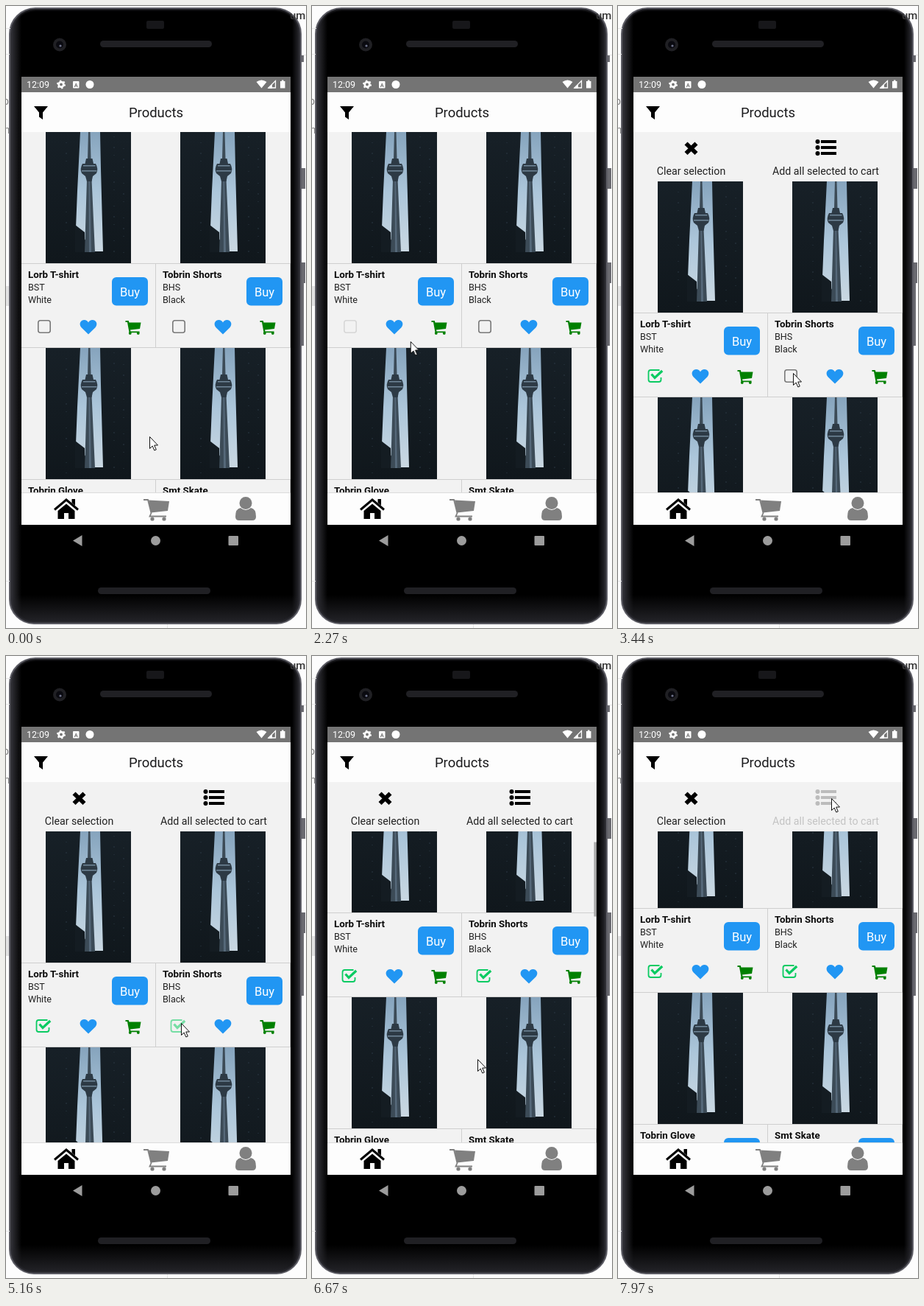
An HTML page for the animation above (8000 ms loop, 408 by 844 pixels).

```html
<!DOCTYPE html>
<html lang="en">
<head>
<meta charset="utf-8">
<title>Shop demo</title>
<style>
html, body { margin: 0; width: 100%; height: 100%; overflow: hidden; background: #fdfdfd; }
svg { display: block; font-family: Roboto, sans-serif; }
#stage { position: absolute; left: 0; top: 0; }
#phone {
  position: absolute; left: 4px; top: 2px; width: 398px; height: 837px; box-sizing: border-box;
  border: 2px solid #5c5c64; border-radius: 36px 36px 34px 34px;
  background:
    linear-gradient(transparent 795px, #26262b 835px),
    linear-gradient(90deg, #34343a, #000 15px, #000 383px, #2c2c32);
  box-shadow: inset 0 0 3px 1px #33333a;
}
.bold { font-weight: 700; font-size: 13.3px; }
.small { font-size: 12.6px; fill: #222; }
.label { font-size: 14.2px; fill: #222; }

/* One loop is 8 s, so 1% is 80 ms. */
.cursor, .list, .bar, .thumb, .press0, .press1, .press-all, .on0, .off0, .on1, .off1 {
  animation: 8s linear infinite;
}
.cursor { animation-name: cursor; animation-timing-function: ease-in-out; }
.list { animation-name: list; }
.thumb { animation-name: thumb; }
.press0 { animation-name: press0; }
.press1 { animation-name: press1; }
.press-all { animation-name: pressAll; }
.bar, .on0 { animation-name: on0; animation-timing-function: step-end; }
.off0 { animation-name: off0; animation-timing-function: step-end; }
.on1 { animation-name: on1; animation-timing-function: step-end; }
.off1 { animation-name: off1; animation-timing-function: step-end; }

@keyframes cursor {
  0%, 1.6% { transform: translate(195px, 584px); }
  7.9% { transform: translate(59px, 446px); animation-timing-function: ease-out; }
  9.5%, 22.5% { transform: translate(55px, 438px); animation-timing-function: ease-in; }
  28.4% { transform: translate(134px, 455px); animation-timing-function: ease-out; }
  33%, 36% { transform: translate(236px, 442px); }
  41%, 66% { transform: translate(238px, 498px); }
  73.5%, 77% { transform: translate(225px, 623px); animation-timing-function: ease-out; }
  83.4% { transform: translate(225px, 547px); animation-timing-function: ease-out; }
  85%, 86.5% { transform: translate(225px, 541px); }
  94.5%, 100% { transform: translate(290px, 193px); }
}
@keyframes list {
  0% { transform: translateY(0); animation-timing-function: step-end; }
  33.5%, 77.6% { transform: translateY(67px); animation-timing-function: ease-out; }
  83.4% { transform: translateY(-1px); animation-timing-function: ease-out; }
  85%, 100% { transform: translateY(-7px); }
}
@keyframes thumb {
  0%, 77.5% { opacity: 0; transform: translateY(0); }
  77.6% { opacity: 1; transform: translateY(0); animation-timing-function: ease-out; }
  83.4% { opacity: 1; transform: translateY(15px); }
  85%, 89% { opacity: 1; transform: translateY(16.5px); }
  92%, 100% { opacity: 0; transform: translateY(16.5px); }
}
@keyframes press0 { 0%, 16.3% { opacity: 1; } 18.2%, 33.5% { opacity: .22; } 36.6%, 100% { opacity: 1; } }
@keyframes press1 { 0%, 46.5% { opacity: 1; } 48.4%, 63.2% { opacity: .22; } 66.4%, 100% { opacity: 1; } }
@keyframes pressAll { 0%, 96.8% { opacity: 1; } 98.7%, 100% { opacity: .22; } }
@keyframes on0 { 0% { opacity: 0; } 33.5%, 100% { opacity: 1; } }
@keyframes off0 { 0% { opacity: 1; } 33.5%, 100% { opacity: 0; } }
@keyframes on1 { 0% { opacity: 0; } 63.2%, 100% { opacity: 1; } }
@keyframes off1 { 0% { opacity: 1; } 63.2%, 100% { opacity: 0; } }
</style>
</head>
<body>
<div id="phone"></div>
<svg id="stage" width="408" height="844" viewBox="0 0 408 844">
  <defs>
    <linearGradient id="sky" x2="0" y2="1">
      <stop stop-color="#86a4bd"/><stop offset=".5" stop-color="#acc6da"/><stop offset="1" stop-color="#cad8e2"/>
    </linearGradient>
    <linearGradient id="dark" x2="0" y2="1">
      <stop stop-color="#172027"/><stop offset="1" stop-color="#10171c"/>
    </linearGradient>
    <g id="photo">
      <path fill="url(#dark)" d="M0 0H116V178H0Z"/>
      <path fill="url(#sky)" d="M47 0H74L75 50L78 162H66L41 130L43 80Z"/>
      <path fill="#141c22" d="M40 126L53 136V163H40Z"/>
      <path fill="#3c4b57" d="M58 0H60.500L61.500 36H57ZM56 64H62.500L67 163H53Z"/>
      <path fill="#56697a" d="M58.500 66H60L62 163H59Z"/>
      <path fill="#2d3a45" d="M55 36H63.500L65 43H68Q72 50 69 56L64 60L62.500 67H56L54 60L49 56Q46 50 50 43H53.500Z"/>
      <path fill="#71879a" d="M51 45H67.500V46.500H51ZM49 52H69.500V53.500H49Z"/>
      <path stroke="#2b3944" stroke-dasharray="1 13 2 9 1 21" fill="none" d="M28 14V170M93 6V168M106 22V174"/>
    </g>
    <path id="heart" fill="#2196f3" d="M0 10L-9.5.8C-14-5-9.5-9.7-5.5-9.5C-3-9.4-1-8 0-6C1-8 3-9.4 5.5-9.5C9.500-9.700 14-5 9.500.8Z"/>
    <g id="cart" fill="#008000">
      <path d="M-10.5-9H-6.3L-5.5-6.6H10.5L9 2-4 3.6-3.5 5.4H8.5V7.2H-5.4L-8-7H-10.5Z"/>
      <circle cx="-4.2" cy="8" r="1.9"/><circle cx="6.8" cy="8" r="1.9"/>
    </g>
    <rect id="empty" x="-8.2" y="-8.2" width="16.4" height="16.4" rx="3" fill="none" stroke="#787878" stroke-width="1.6"/>
    <g id="ticked" fill="none" stroke="#0bcb62">
      <path stroke-width="1.8" d="M5-8H-7Q-10-8-10-5V5Q-10 8-7 8H4Q7 8 7 5V2"/>
      <path stroke-width="3.3" d="M-6-2.5L-1.500 2.500L8.700-7"/>
    </g>
  </defs>

  <!-- Around the phone -->
  <g fill="none" stroke="#e6e6e6"><path d="M0 30.5H6M0 65.5H5M0 780.5H5M219.5 839V844M402 66.5H408"/></g>
  <path fill="#e2e2e2" d="M0 380H4V407H0Z"/>
  <path fill="#6a6a70" d="M402 67H405V76H402ZM402 220H407V248H402ZM402 348H407V376H402ZM402 376H405V461H402Z"/>
  <text x="386" y="18" font-size="15" font-weight="500" fill="#333">um</text>
  <g fill="#808080" font-size="14"><text x="-4" y="134">p</text><text x="-7" y="173">m</text></g>

  <!-- Phone body -->
  <g fill="#202024">
    <rect x="128" y="47" width="152" height="9" rx="4.5"/>
    <rect x="125" y="789" width="153" height="9" rx="4.5"/>
    <rect x="191" y="20" width="24" height="11" rx="2" fill="#17171a"/>
    <circle cx="73" cy="52.5" r="9"/><circle cx="73" cy="52.5" r="5" fill="#0a0a10"/><circle cx="74" cy="54" r="1.6" fill="#70748c"/>
  </g>
  <g fill="#9c9c9c">
    <path d="M91 725.5L103.500 718V733Z"/><circle cx="203.500" cy="725.500" r="6.500"/><rect x="302.500" y="719" width="13.500" height="13" rx="1"/>
  </g>

  <!-- Product list -->
  <svg x="21" y="171" width="366" height="489" viewBox="0 0 366 489">
    <rect width="366" height="489" fill="#f2f2f2"/>
    <g class="list" id="list"></g>
    <g class="bar">
      <rect width="366" height="67" fill="#f2f2f2"/>
      <path d="M71.500 15.500L85.500 29M85.500 15.500L71.500 29" stroke="#000" stroke-width="5.800"/>
      <text class="label" x="78.500" y="58" text-anchor="middle">Clear selection</text>
      <g class="press-all">
        <path d="M255 13H276M255 21H276M255 29H276" stroke="#000" stroke-width="4"/>
        <circle cx="250.500" cy="13" r="3"/><circle cx="250.500" cy="21" r="3"/><circle cx="250.500" cy="29" r="3"/>
        <text class="label" x="261.500" y="58" text-anchor="middle">Add all selected to cart</text>
      </g>
    </g>
    <rect class="thumb" x="362.500" y="66.500" width="3.500" height="101" fill="#a6a6a6"/>
  </svg>

  <!-- Status bar and header -->
  <rect x="21" y="96" width="366" height="21" fill="#747474"/>
  <g fill="#fff">
    <text x="28" y="111" font-size="12.500">12:09</text>
    <circle cx="75" cy="106.500" r="3.300" fill="none" stroke="#fff" stroke-width="2.800"/>
    <circle cx="75" cy="106.500" r="5" fill="none" stroke="#fff" stroke-width="2" stroke-dasharray="2.200 3.036"/>
    <rect x="91" y="102" width="8.500" height="9.500" rx="1"/>
    <text x="95.200" y="109.600" font-size="7.500" font-weight="700" text-anchor="middle" style="fill:#747474">A</text>
    <circle cx="114" cy="106.500" r="5.500"/>
    <path d="M340.500 103Q347.500 98 354.500 103L347.500 111.500ZM373 102H375V100.500H377.500V102H379.500V111.500H373Z"/>
    <path d="M357 111L366.500 101.500V111Z" fill="none" stroke="#fff" stroke-width="1.300"/>
    <path d="M356 112L362 106V112Z"/>
  </g>
  <rect x="21" y="117" width="366" height="54" fill="#fdfdfd"/>
  <path d="M38 136H57L50 144.500V154L45 150.500V144.500Z"/>
  <text x="204" y="151.200" font-size="18.500" text-anchor="middle" fill="#1c1c1e">Products</text>

  <!-- Tab bar -->
  <rect x="21" y="660" width="366" height="44" fill="#fdfdfd"/>
  <path d="M21 660.500H387" stroke="#dcdcdc"/>
  <path d="M66 683.500L82 670L98 683.500" fill="none" stroke="#000" stroke-width="3"/>
  <path d="M70.500 685L82 675.500L93.500 685V696H85V688H79V696H70.500ZM89.500 669H94V678L89.500 674Z"/>
  <g fill="#808080">
    <path d="M194 670.500L222 672L220 685L197 687.500Z"/>
    <path d="M187 670H193L197.500 688L195.500 692.500H218" fill="none" stroke="#808080" stroke-width="1.800"/>
    <circle cx="199" cy="696" r="2.600"/><circle cx="215" cy="696" r="2.600"/>
    <circle cx="326" cy="674.500" r="8.500"/>
    <path d="M319 681Q326 687 333 681Q340 682 340 693Q340 698 335 698H317Q312 698 312 693Q312 682 319 681Z"/>
  </g>

  <g class="cursor">
    <path d="M.5.5V16.500L4.200 13L6.800 19L9.300 18L6.700 12H11.500Z" fill="#fff" stroke="#111" stroke-width="1"/>
  </g>
</svg>
<script>
const products = [
  ["Lorb T-shirt", "BST", "White"],
  ["Tobrin Shorts", "BHS", "Black"],
  ["Tobrin Glove", "BGL", "White"],
  ["Smt Skate", "BSK", "Black"]
];

const checkbox = i => i > 1
  ? `<use href="#empty" x="31" y="264"/>`
  : `<g class="press${i}">
      <g class="off${i}"><use href="#empty" x="31" y="264"/></g>
      <g class="on${i}"><use href="#ticked" x="30.5" y="264"/></g>
    </g>`;

const card = ([name, code, colour], i) => `
  <g transform="translate(${i % 2 * 183} ${Math.floor(i / 2) * 293})">
    <use href="#photo" x="33"/>
    <path d="M0 178.500H183M0 292.500H183M182.500 178V292" stroke="#cfcfcf" fill="none"/>
    <text class="bold" x="9" y="197.700" fill="#0c0c0c">${name}</text>
    <text class="small" x="9" y="215">${code}</text>
    <text class="small" x="9" y="232">${colour}</text>
    <rect x="123" y="197" width="49" height="38.500" rx="6" fill="#2196f3"/>
    <text x="147.500" y="222.500" font-size="16.500" text-anchor="middle" fill="#fff">Buy</text>
    ${checkbox(i)}
    <use href="#heart" x="91" y="264.500"/>
    <use href="#cart" x="152" y="265"/>
  </g>`;

document.getElementById("list").innerHTML = products.map(card).join("");
</script>
</body>
</html>
```
